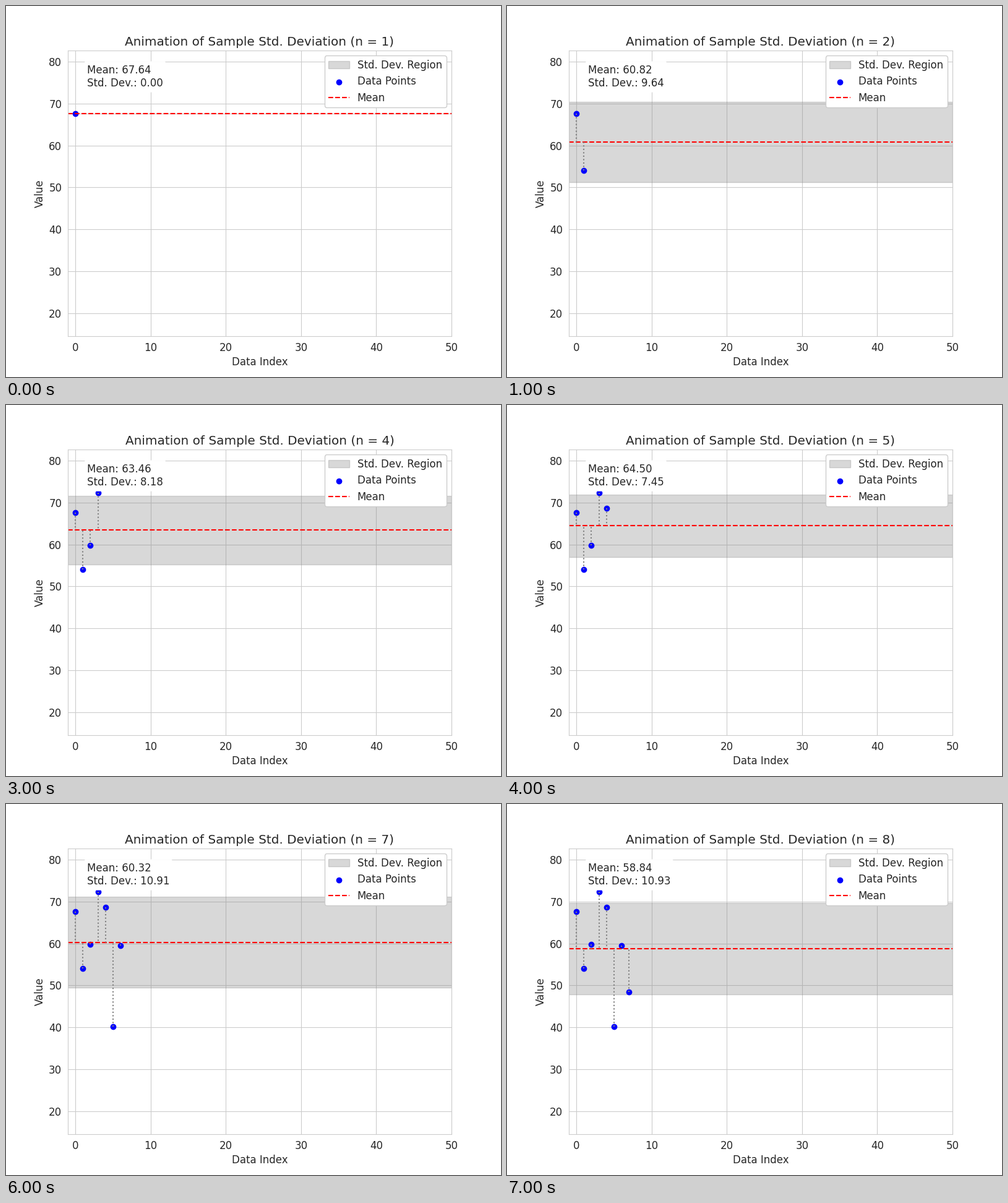
A matplotlib script that plays this animation: 800 px wide and 600 px high, repeating every 8 s.

```python
import numpy as np
import matplotlib.pyplot as plt
from matplotlib.animation import FuncAnimation

INK, RULE = "0.15", "0.8"

plt.rcParams.update({
    "font.family": "DejaVu Sans",
    "font.size": 12,
    "text.color": INK,
    "axes.labelcolor": INK,
    "axes.edgecolor": RULE,
    "axes.grid": True,
    "axes.axisbelow": True,
    "grid.color": RULE,
    "xtick.color": INK,
    "ytick.color": INK,
    "xtick.bottom": False,
    "ytick.left": False,
    "patch.edgecolor": "white",
    "patch.force_edgecolor": True,
})

COUNT, STEPS = 50, 8
values = np.random.RandomState(0).normal(50, 10, COUNT)

fig, ax = plt.subplots(figsize=(8, 6), dpi=100)


def update(step):
    n = step + 1
    sample = values[:n]
    mean = sample.mean()
    std = sample.std(ddof=1) if n > 1 else 0.0

    ax.clear()
    ax.set_xlim(-1, COUNT)
    ax.set_ylim(values.min() - 10, values.max() + 10)
    ax.set_xlabel("Data Index")
    ax.set_ylabel("Value")
    ax.set_title(f"Animation of Sample Std. Deviation (n = {n})")

    ax.axhspan(mean - std, mean + std, color="gray", alpha=0.3,
               label="Std. Dev. Region")
    ax.scatter(range(n), sample, color="blue", label="Data Points")
    ax.axhline(mean, color="red", linestyle="--", label="Mean")
    # Deviations start at the point so a dot always sits on the marker
    for i, value in enumerate(sample):
        ax.plot([i, i], [value, mean], color="gray", linestyle=":")

    ax.text(0.05, 0.95, f"Mean: {mean:.2f}\nStd. Dev.: {std:.2f}",
            transform=ax.transAxes, va="top",
            bbox=dict(boxstyle="round,pad=0.3", facecolor="white"))
    ax.legend(loc="upper right", framealpha=1)
    return []


anim = FuncAnimation(fig, update, frames=STEPS, init_func=lambda: [],
                     interval=1000, repeat=True, repeat_delay=0)
plt.show()
```
